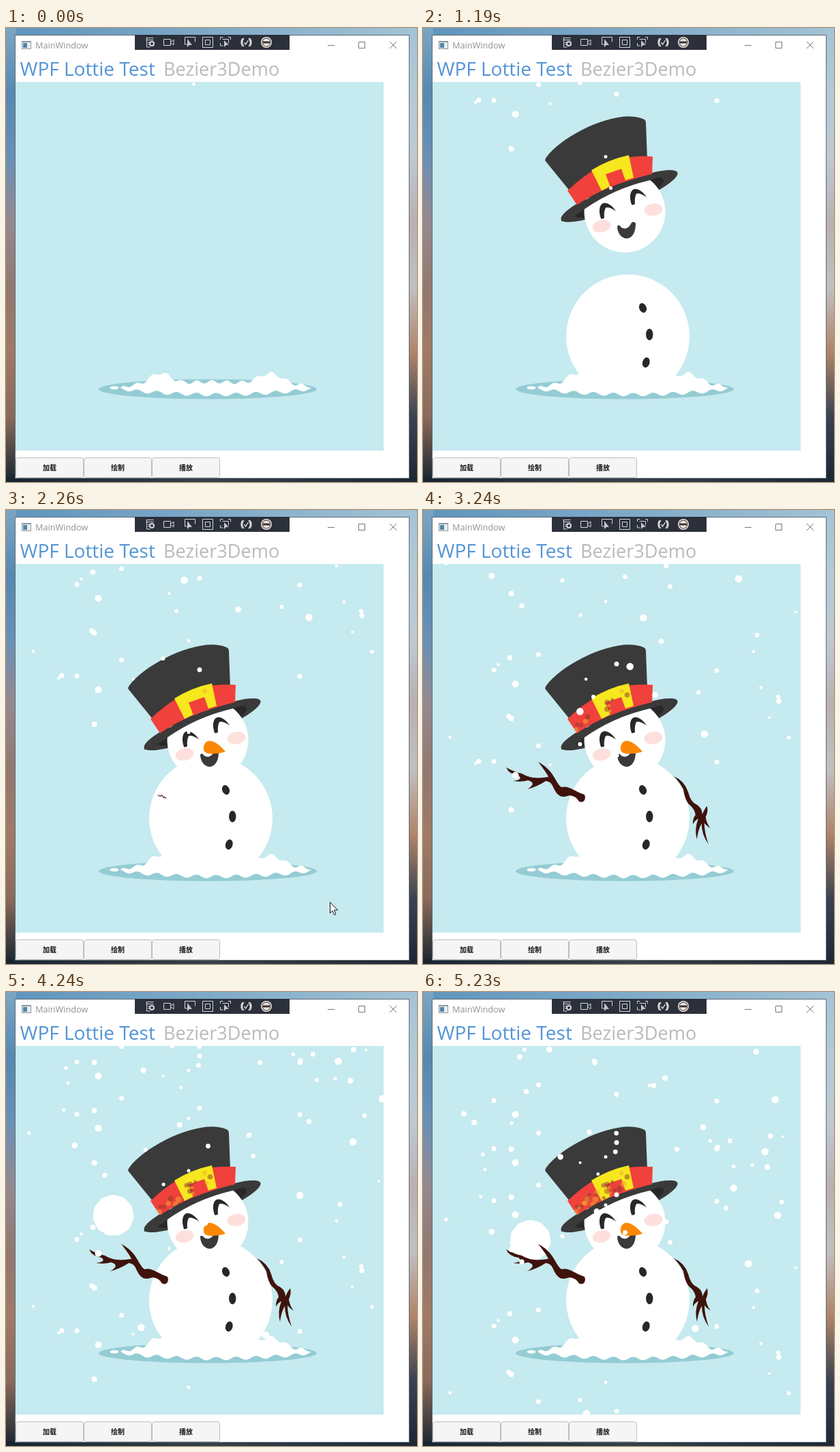
Write an HTML page with a canvas that moves like this. It is 603 px wide and 665 px high and loops after 5.3 s.

```html
<!DOCTYPE html>
<html lang="zh">
<head>
<meta charset="utf-8">
<style>
  html, body { margin: 0; width: 100%; height: 100%; overflow: hidden; }
  canvas { display: block; }
</style>
</head>
<body>
<canvas id="stage" width="603" height="665"></canvas>
<script>
const ctx = document.getElementById('stage').getContext('2d');
const LOOP = 5300;
const DARK = '#3a3a3a', COAL = '#282828', RED = '#f0413c', YELLOW = '#f7e71f', BARK = '#3f130c';

const clamp = v => Math.max(0, Math.min(1, v));
const progress = (t, from, to) => clamp((t - from) / (to - from));
const easeOut = u => 1 - (1 - u) ** 3;
const bump = (x, center, width) => Math.exp(-(((x - center) / width) ** 2));

let seed = 7;
const random = (from = 0, to = 1) => from + (to - from) * ((seed = seed * 16807 % 2147483647) / 2147483647);
const many = (length, make) => Array.from({ length }, (_, i) => make(i));

// Smooth interpolation through [time, value] pairs
function tween(t, keys) {
  let i = 1;
  while (i < keys.length - 1 && t > keys[i][0]) i++;
  const [t0, a] = keys[i - 1], [t1, b] = keys[i];
  const u = progress(t, t0, t1);
  return a + (b - a) * u * u * (3 - 2 * u);
}

function box(x, y, w, h, color) {
  ctx.fillStyle = color;
  ctx.fillRect(x, y, w, h);
}
function oval(x, y, rx, ry, color, deg = 0) {
  ctx.beginPath();
  ctx.ellipse(x, y, rx, ry, deg * Math.PI / 180, 0, 7);
  ctx.fillStyle = color;
  ctx.fill();
}
function shape(d, color) {
  ctx.fillStyle = color;
  ctx.fill(new Path2D(d));
}
function line(d, color, width = 1) {
  ctx.strokeStyle = color;
  ctx.lineWidth = width;
  ctx.stroke(new Path2D(d));
}
function label(text, x, y, font, color, align = 'left') {
  ctx.font = font;
  ctx.textAlign = align;
  ctx.fillStyle = color;
  ctx.fillText(text, x, y);
}
// Evenly spaced colours along the longer side
function gradient(x, y, w, h, colors) {
  const g = w > h ? ctx.createLinearGradient(x, y, x + w, y) : ctx.createLinearGradient(x, y, x, y + h);
  colors.forEach((c, i) => g.addColorStop(i / (colors.length - 1), c));
  box(x, y, w, h, g);
}
function group(draw, x = 0, y = 0, scale = 1, deg = 0, px = 0, py = 0) {
  ctx.save();
  ctx.translate(x + px, y + py);
  ctx.rotate(deg * Math.PI / 180);
  ctx.scale(scale, scale);
  ctx.translate(-px, -py);
  draw();
  ctx.restore();
}

function drawWindow() {
  gradient(0, 0, 603, 12, ['#5f94bd', '#7eaac8', '#a3c3d5']);
  gradient(0, 0, 15, 665, ['#7ba6c2', '#5688b1', '#6a90b5', '#95898f', '#92786f', '#a07a66', '#8a6a5a', '#172530']);
  gradient(590, 0, 13, 665, ['#a3c3d5', '#b4cad6', '#bfc9d2', '#b9b0b2', '#c2bfc2', '#b08468', '#3a4250', '#1d2834']);
  gradient(0, 658, 603, 7, ['#172530', '#36404a', '#1d2834']);
  box(13, 10, 579, 650, '#5f6d78');
  box(14, 11, 577, 648, '#fff');

  box(23, 19, 14, 12, '#8d969c');
  box(24, 21, 12, 9, '#e9eef2');
  box(25, 22, 6, 7, '#4f88a8');
  label('MainWindow', 43, 30, '12.7px "Open Sans", sans-serif', '#929292');
  line('M472 25.5h10M517.5 20.5h9v9h-9zM563 20l10 10M573 20l-10 10', '#777');
  label('WPF Lottie Test', 20.5, 70, '28px "Open Sans", sans-serif', '#5294d6');
  label('Bezier3Demo', 231, 70, '27.1px "Open Sans", sans-serif', '#bababa');

  box(189, 10, 227, 22, '#2b303b');
  line('M205.5 14.5h11M205.5 17.5h11M206.5 14v14h5M208 21h4M208 24h3M231.5 16.5h10v9h-10zM242 20l4-3v8l-4-3' +
    'M268 24h-5.5v-10.5h15v7M288.5 13.5h15v15h-15zM292.5 17.5h7v7h-7z' +
    'M314.5 17v-3.5h4M326 13.5h3.5v3.5M314.5 22v4h4M317.5 16.5h9v6', '#d5d8dc');
  shape('M266 16v12l3-3h4zM320 18v10l3-3h4z', '#c5c8cd');
  line('M349 15q-5 6 0 12M356 15q5 6 0 12M347 15q-4 6 0 12M358 15q4 6 0 12M349.5 21l2 3 4-6', '#eee', 1.3);
  oval(214, 23, 4, 4, '#d5d8dc');
  oval(214, 23, 2, 2, '#2b303b');
  oval(382, 21, 8, 8, '#f0e7df');
  oval(382, 21, 6.5, 6.5, '#3b3436');
  oval(382, 21, 5.5, 5.5, '#f0e7df');
  box(377, 19.5, 10, 3, '#3b3436');

  ['加载', '绘制', '播放'].forEach((name, i) => {
    ctx.beginPath();
    ctx.roundRect(14.5 + i * 100, 629.5, 99, 29, 3);
    ctx.fillStyle = '#f5f5f5';
    ctx.fill();
    ctx.strokeStyle = '#bdbdbd';
    ctx.lineWidth = 1;
    ctx.stroke();
    label(name, 64 + i * 100, 648, 'bold 10px "Noto Sans CJK SC", "Noto Sans CJK", sans-serif', '#111', 'center');
  });
}

function drawMound() {
  const left = 168, right = 448;
  const wave = (x, crest, length) => Math.cos((x - crest) / length * 2 * Math.PI);
  const taper = x => Math.sqrt(clamp(Math.min(x - left, right - x) / 16));
  const top = x => 3 + 17 * bump(x, 226, 22) + 17 * bump(x, 388, 26) + 6 * bump(x, 302, 65) + 2.5 * wave(x, 302, 22);
  const bottom = x => 3 + 7 * Math.sin((x - left) / (right - left) * Math.PI) + 2.5 * wave(x, 265, 29);
  ctx.beginPath();
  for (let x = left; x <= right; x += 2) ctx.lineTo(x, 527 - top(x) * taper(x));
  for (let x = right; x >= left; x -= 2) ctx.lineTo(x, 527 + bottom(x) * taper(x));
  ctx.fillStyle = '#fff';
  ctx.fill();
  oval(159, 527, 6.5, 2.5, '#fff');
}

function drawBody() {
  ctx.beginPath();
  ctx.arc(300.5, 451.5, 90.5, Math.PI - .95, .95);
  ctx.fillStyle = '#fff';
  ctx.fill();
  oval(322.5, 410, 5.3, 7.2, COAL, -22);
  oval(332.3, 449, 5.2, 8.5, COAL);
  oval(327.3, 490, 5.3, 7.5, COAL, 15);
}

const BAND = 'M212 306Q255 264 303 257Q318 255 337 256L336 283Q270 296 226 327Z';
const stains = many(30, () => {
  const along = random() ** 1.3;
  return {
    x: 218 + along * 85, y: 318 - along * 55 + random(-8, 16), r: random(2.5, 4.5),
    born: random(2200, 5000), color: random() < .5 ? '#8a3a2a' : '#f0b428'
  };
});

function drawHead(t) {
  oval(288, 314, 92, 17.5, DARK, -22);
  oval(288, 316, 70, 15, COAL, -22);
  oval(296, 337, 59.5, 59.5, '#fff');
  shape('M180 263Q178 261 181 257C205 224 286 185 323 201Q327 202 327 207L330 286L228 322Z', DARK);
  shape(BAND, RED);
  shape('M247 276Q273 260 302 254L309 287Q284 294 262 306Z', YELLOW);
  shape('M268 282L291 274L297 291L275 301Z', RED);
  ctx.save();
  ctx.clip(new Path2D(BAND));
  ctx.globalAlpha = .5;
  stains.forEach(s => t > s.born && oval(s.x, s.y, s.r, s.r, s.color));
  ctx.restore();
  shape('M203 351C200 330 330 269 374 280Q352 284 332 291Q280 303 237 333Q215 350 203 351Z', DARK);

  oval(262, 358, 13.5, 9, '#fde0dc', -12);
  oval(338, 334, 13.5, 9, '#fde0dc', -8);
  const eye = () => shape('M261 347C257 335 259 325 266 324C273 324 279 330 283 336Q272 329 268 331' +
    'Q265 337 266 346Q263 348 261 347Z', COAL);
  eye();
  group(eye, 45, -20.5);
  shape('M285 358Q288 355 291 360Q300 365 306 353Q309 350 312 354C312 370 305 376 299 376C291 376 285 368 285 358Z', DARK);
  group(() => shape('M290 351C289 344 293 338 299 338C308 339 315 346 322 354Q314 357 302 357C294 357 291 355 290 351Z', '#fb8804'),
    0, 0, easeOut(progress(t, 1750, 2050)), 0, 300, 349);
}

function drawBall(t) {
  const y = tween(t, [[3700, 357], [3800, 356], [4180, 325], [4640, 370], [4760, 380], [5050, 364]]);
  const size = easeOut(progress(t, 3380, 3680));
  ctx.beginPath();
  for (let a = 0; a < 6.28; a += .06) {
    const r = size * (29 + Math.abs(Math.sin(a * 5.5 + 1)));
    ctx.lineTo(157.5 + r * Math.cos(a), y + r * Math.sin(a));
  }
  ctx.fillStyle = '#fff';
  ctx.fill();
}

function drawArms(t) {
  const swing = tween(t, [[4250, 0], [4640, -19], [4720, -19], [5050, 0]]);
  group(() => shape('M237 417C222 412 214 403 203 406C193 398 193 382 169 369C179 382 183 388 184 391' +
    'C165 394 155 392 145 386Q134 384 122 377Q126 387 140 389Q148 395 132 397Q145 399 154 396' +
    'Q168 400 153 409Q168 405 180 397Q188 397 192 408C200 424 208 420 215 418Q225 419 229 427Q237 430 238 421Z', BARK),
    0, 0, easeOut(progress(t, 2240, 2750)), swing, 235, 422);
  group(() => shape('M368 390Q384 397 389 413Q393 429 402 432Q410 437 410 446Q414 437 417 434Q419 442 415 450' +
    'Q416 459 422 467Q416 463 413 459Q413 472 419 490Q409 476 409 460Q404 468 402 483Q398 468 404 453' +
    'Q400 454 396 461Q396 451 400 447Q399 438 390 431Q384 424 382 409Q376 398 368 390Z', BARK),
    0, 0, easeOut(progress(t, 2550, 3400)), 0, 369, 391);
}

// Every flake enters at the top edge at its own time; speeds are px per second
const ENTRY = 77;
const columns = [[104, 3.5, 965], [135.5, 5, 805], [129.5, 4, 410], [169.5, 3.5, 1145],
  [284, 3.5, 1035], [431, 3.5, 960], [268, 2.5, 320]];
const delays = [0, 1046, 2478, 3075, 3626];
const flakes = [
  { x: 275.5, r: 2.5, born: -40, speed: 128, wind: 0 },
  ...columns.flatMap(([x, r, born]) => delays.map(d => ({ x, r, born: born + d, speed: 128, wind: 0 }))),
  ...many(64, () => ({ x: random(20, 550), r: random(2, 4.5), born: random(900, 5200), speed: 128, wind: 0 })),
  ...many(10, i => ({ x: random(250, 600), r: 5.3, born: 1800 + i * 330, speed: random(170, 213), wind: -32 }))
];

function drawSnow(t) {
  flakes.forEach(({ x, r, born, speed, wind }) => {
    const age = (t - born) / 1000;
    if (age > 0) oval(x + wind * age, ENTRY + speed * age, r, r, '#fff');
  });
}

function drawCursor(t) {
  if (t < 2060 || t > 2350) return;
  const u = easeOut(progress(t, 2060, 2250));
  group(() => {
    const arrow = 'M.5 .5V16.5L4 13L6.5 19L9 18L6.5 12H11.5Z';
    shape(arrow, '#fff');
    line(arrow, '#111');
  }, 545 - 70 * u, 664 - 90 * u);
}

function draw(t) {
  drawWindow();
  ctx.save();
  ctx.beginPath();
  ctx.rect(14, 79, 540, 540);
  ctx.clip();
  box(14, 79, 540, 540, '#c5eaef');
  oval(296, 529, 160, 14.5, '#94ccd4');
  group(drawBody, 0, -480 * (1 - progress(t, 150, 600) ** 2));
  drawMound();
  group(() => drawHead(t), 0, -330 * (1 - progress(t, 830, 1235) ** 2));
  drawBall(t);
  drawArms(t);
  drawSnow(t);
  ctx.restore();
  drawCursor(t);
}

const start = performance.now();
function tick() {
  draw((performance.now() - start) % LOOP);
  requestAnimationFrame(tick);
}
tick();
</script>
</body>
</html>
```
